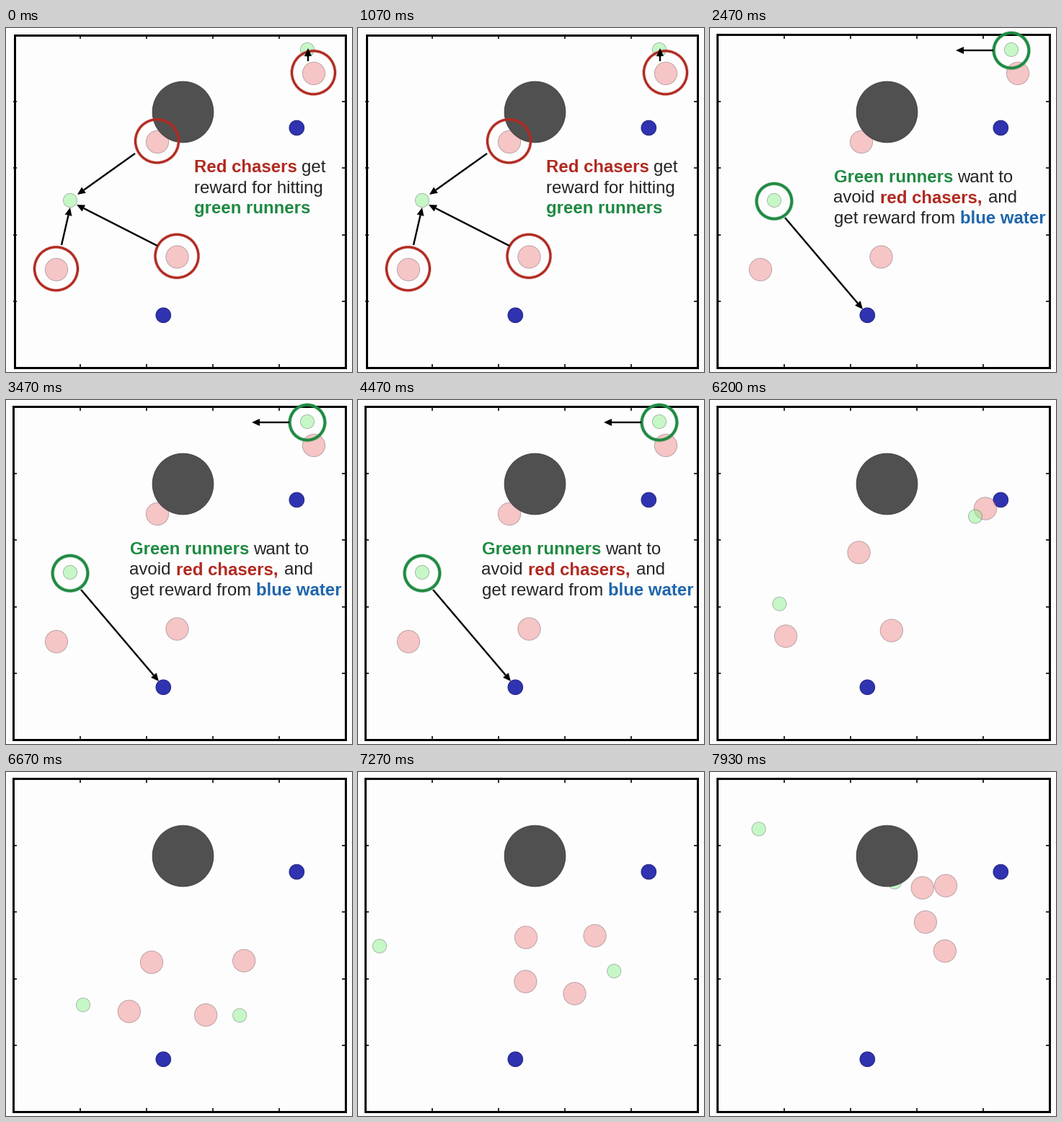
Recreate the animation shown at these times as a matplotlib script. Size 480 px wide and 477 px high, loop 8000 ms.

```python
import numpy as np
import matplotlib.pyplot as plt
from matplotlib.animation import FuncAnimation
from matplotlib.patches import Circle, Polygon, Rectangle

W, H, DPI = 480, 477, 96
PX = 72 / DPI                      # points per pixel
LOOP, STEP = 8000, 50
CUT_RUNNERS, CUT_PLAY = 2150, 5400
KEYS = [CUT_PLAY, 5800, 6670, 7930]

RED, GREEN, BLUE, INK = "#b02a20", "#1f8a42", "#1f66ac", "#242424"
PINK, MINT = (0.94, 0.56, 0.56, 0.5), (0.56, 0.95, 0.57, 0.5)

# where each agent stands at the four key times
CHASERS = [
    [(70, 335), (70, 324), (173, 332), (302, 205)],
    [(210, 158), (210, 166), (202, 264), (297, 158)],
    [(237.5, 317.5), (238, 306), (278, 337), (327, 246)],
    [(427, 63), (424, 63), (330, 262), (327, 155)],
]
RUNNERS = [
    [(89, 239), (88, 247), (107, 323), (67, 73)],
    [(418, 30), (402, 23), (323, 338), (254, 148)],
]


def glide(path, t):
    """Cubic motion through the key points: from rest, without overshoot."""
    p = np.array(path, float)
    d = np.diff(p, axis=0) / np.diff(KEYS)[:, None]
    a, b = d[:-1], d[1:]
    inner = (np.sign(a) + np.sign(b)) / 2 * np.minimum(abs(a), abs(b))
    v = np.vstack([0 * d[:1], inner, d[-1:]])
    if t <= KEYS[0]:
        return p[0]
    if t >= KEYS[-1]:
        return p[-1] + v[-1] * (t - KEYS[-1])
    i = np.searchsorted(KEYS, t, side="right") - 1
    h = KEYS[i + 1] - KEYS[i]
    u = (t - KEYS[i]) / h
    return ((1 + 2 * u) * (1 - u) ** 2 * p[i] + u * (1 - u) ** 2 * h * v[i]
            + u * u * (3 - 2 * u) * p[i + 1] + u * u * (u - 1) * h * v[i + 1])


def swerve(path, t):
    """Sideways detour of a runner towards its own wall on the last leg."""
    u = np.clip((t - KEYS[2]) / (KEYS[3] - KEYS[2]), 0, 1)
    side = np.sign(path[0][0] - W / 2)
    return np.array([65 * side * np.sin(np.pi * u) ** 2, 0])


fig = plt.figure(figsize=(W / DPI, H / DPI), dpi=DPI, facecolor="#fefdfe")
ax = fig.add_axes([0, 0, 1, 1])
ax.set_xlim(0, W)
ax.set_ylim(H, 0)
ax.axis("off")


def disc(center, r, face, z, edge=(0, 0, 0, 0.25)):
    return ax.add_patch(Circle(center, r, fc=face, ec=edge, lw=PX, zorder=z))


def line(xs, ys, width, z):
    return ax.plot(xs, ys, color="black", lw=width * PX, solid_capstyle="butt", zorder=z)[0]


def ring(center, r, color, width):
    return [ax.add_patch(Circle(center, r, fill=False, ec=color, lw=w * PX, alpha=a, zorder=6))
            for w, a in ((width + 2, 0.18), (width, 1))]


def arrow(x0, y0, x1, y1):
    tip = np.array([x1, y1], float)
    d = tip - (x0, y0)
    d /= np.hypot(*d)
    n = np.array([-d[1], d[0]])
    neck = tip - 11 * d
    head = Polygon([tip, neck + 5 * n, neck - 5 * n], fc="black", ec="none", zorder=8)
    return [line([x0, neck[0]], [y0, neck[1]], 2.4, 8), ax.add_patch(head)]


def words(x, y, s, color=INK):
    weight = "normal" if color == INK else "bold"
    return [ax.text(x, y, s, color=color, weight=weight, family="Liberation Sans",
                    size=24 * PX, va="baseline", zorder=9)]


# arena
border = ax.add_patch(Rectangle((0, 0), 1, 1, fill=False, ec="black", lw=3 * PX, zorder=5))
for k in range(4):
    x, y = 103 + 92 * k, 102 + 92.4 * k
    for near, far in ((10, 15), (466, 471)):
        line([x, x], [near, far], 1.6, 5)
        line([near, far], [y, y], 1.6, 5)
disc((245.5, 116.5), 42.3, "#515051", 4, "#424142")
for spot in ((403.3, 138.5), (218.3, 398.3)):
    disc(spot, 10.3, "#2f33b0", 2, "#20247f")

# agents
chasers = [(disc(p[0], 15.7, PINK, 3), p) for p in CHASERS]
runners = [(disc(p[0], 9.6, MINT, 3), p) for p in RUNNERS]

# captions
chaser_notes = (
    arrow(179, 174, 99, 231) + arrow(77, 301, 89, 249)
    + arrow(210, 302, 98, 245) + arrow(419, 46, 419, 28)
    + words(261, 200, "Red chasers", RED) + words(410, 200, "get")
    + words(261, 229, "reward for hitting")
    + words(261, 257.5, "green runners", GREEN)
)
for (x, y), *_ in CHASERS:
    chaser_notes += ring((x - 0.5, y - 1.2), 30, RED, 3.2)

runner_notes = (
    arrow(393, 31, 341, 31) + arrow(104, 263, 212, 390)
    + words(171.5, 214, "Green runners", GREEN) + words(343, 214, "want to")
    + words(171.5, 242.5, "avoid") + words(236.5, 242.5, "red chasers,", RED)
    + words(386, 242.5, "and")
    + words(171.5, 271, "get reward from") + words(347, 271, "blue water", BLUE)
)
for (x, y), *_ in RUNNERS:
    runner_notes += ring((x, y + 1.2), 24.4, GREEN, 3.9)


def draw(i):
    t = i * STEP
    first = t < CUT_RUNNERS
    for note in chaser_notes:
        note.set_visible(first)
    for note in runner_notes:
        note.set_visible(CUT_RUNNERS <= t < CUT_PLAY)
    border.set_bounds(*((11.5, 10, 459, 461) if first else (10.3, 9, 460.7, 462)))
    for shape, path in chasers:
        shape.center = glide(path, t)
    for shape, path in runners:
        shape.center = glide(path, t) + swerve(path, t)
    return []


anim = FuncAnimation(fig, draw, frames=LOOP // STEP, interval=STEP,
                     init_func=lambda: draw(0), repeat=True, repeat_delay=0)
plt.show()
```
